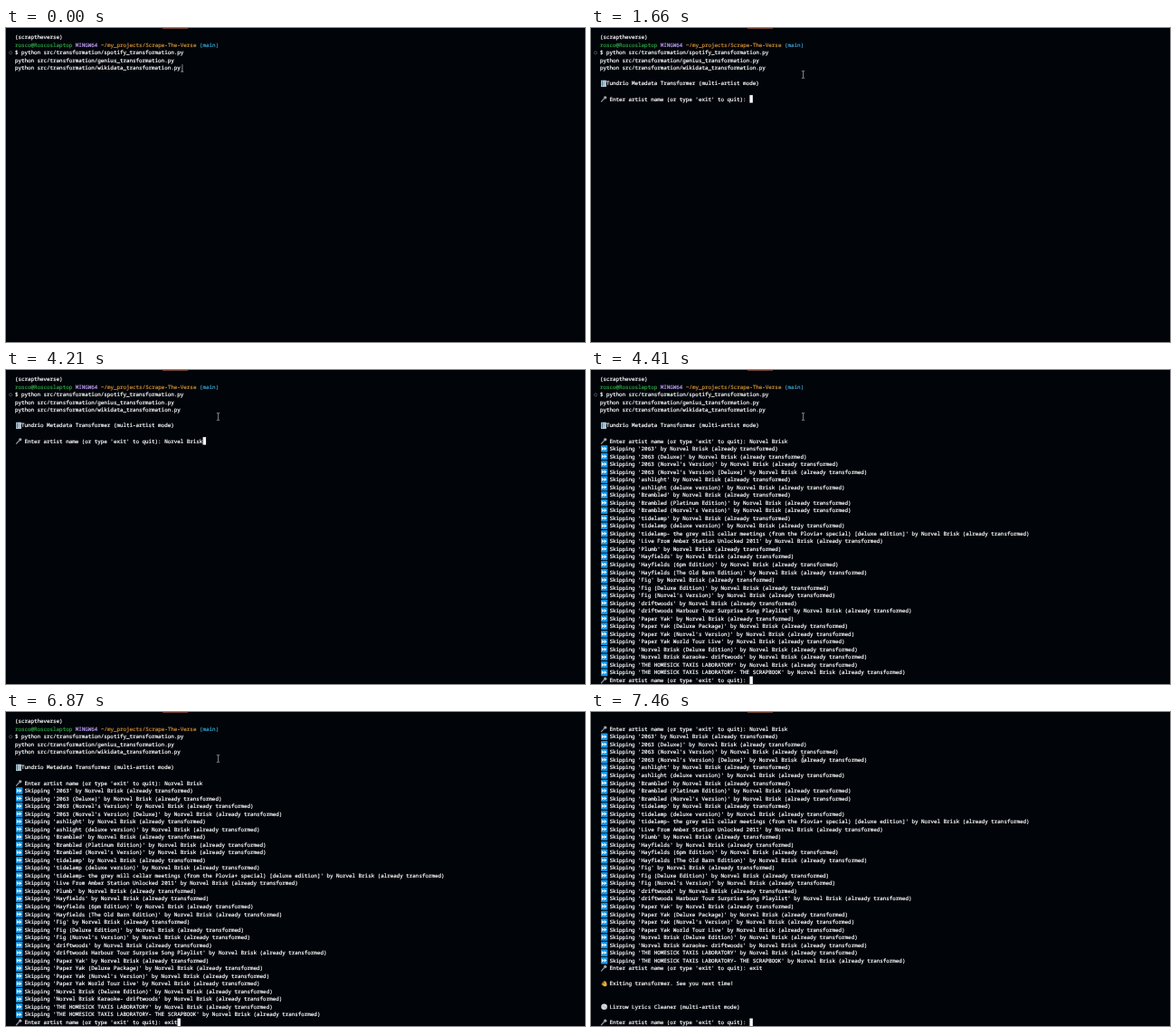
An HTML page that plays this animation: 640x347 px, repeating every 8000 ms.

```html
<!DOCTYPE html>
<html lang="en">
<head>
<meta charset="utf-8">
<title>Terminal session</title>
<style>
  html, body { margin: 0; width: 100%; height: 100%; overflow: hidden; background: #010409; }
  svg { display: block; width: 100vw; height: 100vh; }
  text {
    font: 5.867px "Noto Sans Mono", "DejaVu Sans Mono", monospace;
    color: #fff;
    fill: currentColor;
    stroke: currentColor;
    stroke-width: .2;
    white-space: pre;
    text-rendering: geometricPrecision;
    font-variant-ligatures: none;
  }
</style>
</head>
<body>
<svg id="stage" viewBox="0 0 640 347" xmlns="http://www.w3.org/2000/svg">
  <defs>
    <g id="skip">
      <rect x="1.1" y=".5" width="7.4" height="7.6" rx=".7" fill="#1495e4"/>
      <path d="M2 2.2L4.7 4.25L2 6.3ZM4.7 2.2L7.6 4.25L4.7 6.3Z" fill="#f4faff"/>
    </g>
    <g id="mic">
      <path d="M1.6 7.2L5 3.4" stroke="#8b9097" stroke-width="1.3" stroke-linecap="round"/>
      <circle cx="5.8" cy="2.7" r="1.7" fill="#a4a9af"/>
      <path d="M4.3 2.8L5.8 4.3" stroke="#4c525a" stroke-width=".6"/>
    </g>
    <g id="score">
      <rect x="1.1" y=".7" width="6" height="7.1" rx=".5" fill="#b9ccd8"/>
      <path d="M1.1 2.5H7M1.1 4.2H7M1.1 5.9H7" stroke="#71889a" stroke-width=".4"/>
      <path d="M2.7 1.4V7" stroke="#3f7fa8" stroke-width="1"/>
    </g>
    <g id="wave">
      <path d="M3 3.2L5.3 6M4.3 2L6.4 5M5.9 1.8L7 4.6M2.3 4.8L4.4 6.5" stroke="#e9b13d" stroke-width="1.1" stroke-linecap="round"/>
      <circle cx="5.7" cy="5.5" r="1.9" fill="#e9b13d"/>
    </g>
    <g id="soap">
      <circle cx="4.7" cy="4.3" r="3.3" fill="#d9dce0"/>
      <circle cx="3.7" cy="3.5" r=".8" fill="#9aa1aa"/>
      <circle cx="5.8" cy="5.2" r=".9" fill="#aab0b8"/>
    </g>
  </defs>
  <rect width="640" height="347" fill="#010409"/>
  <rect x="173" y="0" width="28" height="1" fill="#6e3a2e"/>
  <g id="screen"></g>
  <rect id="block" width="3.5" height="8.5" fill="#f4f6f8"/>
  <path id="idle" d="M193.2 48.2H196.2M194.9 40.2V48.2" fill="none" stroke="#c9d1d9" stroke-width=".7"/>
  <path id="mouse" d="M-1.6 -4H-.5L0 -3.6L.5 -4H1.6M0 -3.6V3.6M-1.6 4H-.5L0 3.6L.5 4H1.6" fill="none" stroke="#b4b9bf" stroke-width=".7"/>
</svg>
<script>
const LOOP = 8000, LEFT = 9.9, TOP = 5.9, CELL = 3.52, PITCH = 8.53;
const BASE = 6.4;
const artist = "Norvel Brisk";
const own = "(Norvel's Version)";
const ask = "Enter artist name (or type 'exit' to quit): ";

const albums = [
  "2063", "2063 (Deluxe)", `2063 ${own}`, `2063 ${own} [Deluxe]`,
  "ashlight", "ashlight (deluxe version)",
  "Brambled", "Brambled (Platinum Edition)", `Brambled ${own}`,
  "tidelamp", "tidelamp (deluxe version)",
  "tidelamp- the grey mill cellar meetings (from the Plovia+ special) [deluxe edition]",
  "Live From Amber Station Unlocked 2011", "Plumb",
  "Hayfields", "Hayfields (6pm Edition)", "Hayfields (The Old Barn Edition)",
  "Fig", "Fig (Deluxe Edition)", `Fig ${own}`,
  "driftwoods", "driftwoods Harbour Tour Surprise Song Playlist",
  "Paper Yak", "Paper Yak (Deluxe Package)", `Paper Yak ${own}`, "Paper Yak World Tour Live",
  `${artist} (Deluxe Edition)`, `${artist} Karaoke- driftwoods`,
  "THE HOMESICK TAXIS LABORATORY", "THE HOMESICK TAXIS LABORATORY- THE SCRAPBOOK"
];

// Runs: [column, text, colour]
const plain = (text, col = 0) => ({ runs: [[col, text]] });
const withIcon = (icon, text, col = 3) => ({ icon, runs: [[col, text]] });
const blank = { runs: [] };

const lines = [
  plain("(scraptheverse)"),
  { runs: [
    [0, "rosco@Roscoslaptop", "#2ea043"],
    [19, "MINGW64", "#bc9cf0"],
    [27, "~/my_projects/Scrape-The-Verse", "#cf8f35"],
    [58, "(main)", "#38a5cf"]
  ] },
  plain("$ python src/transformation/spotify_transformation.py"),
  plain("python src/transformation/genius_transformation.py"),
  plain("python src/transformation/wikidata_transformation.py"),
  blank,
  withIcon("score", "Tundrio Metadata Transformer (multi-artist mode)", 2),
  blank,
  withIcon("mic", ask),
  ...albums.map(a => withIcon("skip", `Skipping '${a}' by ${artist} (already transformed)`)),
  withIcon("mic", ask),
  blank,
  withIcon("wave", "Exiting transformer. See you next time!"),
  blank, blank,
  withIcon("soap", "Lirrow Lyrics Cleaner (multi-artist mode)"),
  blank,
  withIcon("mic", ask)
];

// Steps: [time, lines shown, cursor row, cursor column, scrolled rows]
const steps = [
  [0, 5, 4, 52, 0],
  [1000, 5, 5, 0, 0],
  [1590, 7, 7, 0, 0],
  [1660, 9, 8, 47, 0],
  [4230, 9, 9, 0, 0],
  [4320, 24, 24, 0, 0],
  [4410, 40, 39, 47, 0],
  [7270, 42, 43, 0, 4],
  [7460, 47, 46, 47, 7]
];

const inputs = [
  { row: 8, text: artist,
    keys: [2790, 2990, 2990, 3200, 3340, 3440, 3540, 3640, 3740, 3840, 3940, 4140] },
  { row: 39, text: "exit", keys: [6410, 6610, 6740, 6870] }
];

const $ = id => document.getElementById(id);
function add(parent, tag, attrs) {
  const el = document.createElementNS("http://www.w3.org/2000/svg", tag);
  for (const k in attrs) el.setAttribute(k, attrs[k]);
  return parent.appendChild(el);
}
const show = (el, on) => el.setAttribute("visibility", on ? "visible" : "hidden");
const move = (el, x, y) => el.setAttribute("transform", `translate(${x} ${y})`);

const rows = lines.map(({ icon, runs }, i) => {
  const g = add($("screen"), "g", { transform: `translate(${LEFT} ${TOP + i * PITCH})` });
  if (icon) add(g, "use", { href: "#" + icon });
  for (const [col, text, color] of runs) {
    const t = add(g, "text", { x: col * CELL, y: BASE });
    t.textContent = text;
    if (color) t.style.color = color;
  }
  return g;
});
add(rows[2], "circle", { cx: -4.8, cy: 4.4, r: 1.6, fill: "none", stroke: "#6e7681", "stroke-width": .6 });

function moveMouse(t) {
  show($("mouse"), t >= 70);
  const k = Math.min(6, Math.max(0, Math.floor((t - 70) / (400 / 6) + 1e-6))) / 6;
  const ease = 1 - (1 - k) ** 2;
  move($("mouse"), 619 - 384.5 * ease, 334 - 282.5 * ease);
}

function render(t) {
  let [, shown, row, col, scroll] = steps.filter(s => t >= s[0]).pop();
  for (const { row: r, text, keys } of inputs) {
    const n = keys.filter(k => t >= k).length;
    rows[r].querySelector("text").textContent = ask + text.slice(0, n);
    if (row === r) col += n;
  }
  rows.forEach((g, i) => show(g, i < shown && i >= scroll));
  move($("screen"), 0, -scroll * PITCH);
  move($("block"), LEFT + col * CELL, TOP + (row - scroll) * PITCH);
  show($("block"), t >= 70);
  show($("idle"), t < 70);
  moveMouse(t);
}

const start = performance.now();
function tick() {
  render((performance.now() - start) % LOOP);
  requestAnimationFrame(tick);
}
tick();
</script>
</body>
</html>
```
